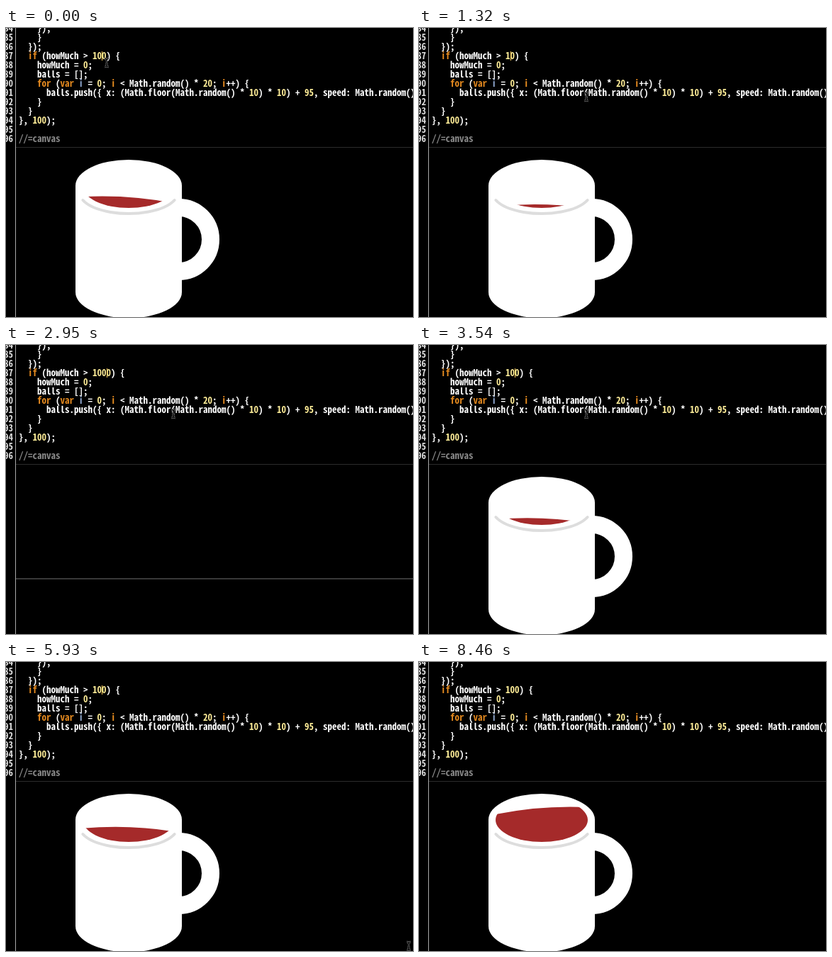
These frames come from a looping animation (574 px wide and 408 px high, 8.51 s). An HTML page with a canvas:

```html
<!DOCTYPE html>
<html lang="en">
<head>
<meta charset="utf-8">
<title>Filling mug</title>
<style>
  html, body { margin: 0; width: 100%; height: 100%; overflow: hidden; background: #000; }
  canvas { display: block; width: 574px; height: 408px; }
</style>
</head>
<body>
<canvas id="stage" width="574" height="408"></canvas>
<script>
const ctx = document.getElementById('stage').getContext('2d');
const W = 574, H = 408, LOOP = 8510;
const FIRST = 117, STEP = 148.8;      // the screen refreshes in even steps
const CHAR = 6.5, LINE = 13, LEFT = 18;
const FAMILY = '"Noto Sans Mono CJK JP", "Noto Sans Mono CJK SC", "Noto Sans Mono", "DejaVu Sans Mono", monospace';
const COLORS = {
  text: '#fff', number: '#ffee98', keyword: '#e58a1f',
  def: '#8da6ce', local: '#e58a1f', comment: '#8a8a8a'
};

// One entry per edit: first step, digits before the caret, blank steps,
// step at which the liquid starts, and how long it rises before a reset.
const EDITS = [
  { at: 0, typed: '10', blank: 0, start: -2.15, cycle: 9 },
  { at: 4, typed: '1', blank: 1, start: 5, cycle: 0.25 },
  { at: 13, typed: '', blank: 1, start: 14, cycle: 0.12 },
  { at: 17, typed: '1', blank: 1, start: 17, cycle: 9 },
  { at: 18, typed: '10', blank: 1, start: 18.4, cycle: 9 },
  { at: 20, typed: '100', blank: 1, start: 20.4, cycle: 9 },
  { at: 22, typed: '10', blank: 1, start: 22.72, cycle: 9 },
  { at: 37, typed: '10', blank: 0, start: 37, cycle: 9 },
  { at: 50, typed: '10', blank: 0, start: 50, cycle: 9 }
];

// step, x, y
const POINTER = [[0, 142, 49], [4, 236, 97], [24, 236, 97], [30, 490, 311],
  [33, 490, 311], [34, 491, 312], [36, 491, 312], [39, 568, 401]];
const POINTER_GONE = 52;

// age in seconds, slope of the liquid surface
const TILT = [[0, 0], [0.19, 2.5], [0.32, 4.6], [0.45, 2.2], [1.04, -5], [1.2, 0]];

function track(keys, pos, col = 1) {
  if (pos <= keys[0][0]) return keys[0][col];
  for (let i = 1; i < keys.length; i++) {
    const a = keys[i - 1], b = keys[i];
    if (pos <= b[0]) return a[col] + (b[col] - a[col]) * (pos - a[0]) / (b[0] - a[0]);
  }
  return keys[keys.length - 1][col];
}

ctx.font = `bold 100px ${FAMILY}`;
const fontSize = CHAR * 100 / ctx.measureText('0').width;
const FONT = `bold ${fontSize}px ${FAMILY}`;

const codeLines = limit => [
  '    }),',
  '    }',
  '  });',
  `  if (howMuch > ${limit}) {`,
  '    howMuch = 0;',
  '    balls = [];',
  '    for (var i = 0; i < Math.random() * 20; i++) {',
  '      balls.push({ x: (Math.floor(Math.random() * 10) * 10) + 95, speed: Math.random() * 10 });',
  '    }',
  '  }',
  '}, 100);',
  '',
  '//=canvas'
];

function tokenColor(token, before) {
  if (token.startsWith('//')) return COLORS.comment;
  if (/^\d/.test(token)) return COLORS.number;
  if (/^(if|for|var)$/.test(token)) return COLORS.keyword;
  if (token === 'i') return before.endsWith('var ') ? COLORS.def : COLORS.local;
  return COLORS.text;
}

function drawCode(limit) {
  ctx.font = FONT;
  ctx.textBaseline = 'alphabetic';
  codeLines(limit).forEach((line, row) => {
    const y = 5 + row * LINE;
    ctx.fillStyle = '#ddd';
    ctx.fillText(String(84 + row), -3, y);
    for (const m of line.matchAll(/\/\/.*|\w+|[^\w\s]+/g)) {
      ctx.fillStyle = tokenColor(m[0], line.slice(0, m.index));
      ctx.fillText(m[0], LEFT + m.index * CHAR, y);
    }
  });
}

function drawLiquid(age) {
  if (age <= 0) return;
  const cx = 173, cy = 223, rx = 65, ry = 31;
  ctx.save();
  ctx.beginPath();
  ctx.ellipse(cx, cy, rx, ry, 0, 0, Math.PI * 2);
  ctx.clip();
  ctx.fillStyle = '#a52a2a';
  ctx.beginPath();
  if (age > 1.07) {
    ctx.rect(cx - rx, cy - ry, rx * 2, ry * 2);
  } else {
    const mid = 253.4 - 45.4 * age, tilt = track(TILT, age), bulge = 4;
    ctx.moveTo(cx - rx, mid + bulge - tilt);
    ctx.quadraticCurveTo(cx, mid - bulge, cx + rx, mid + bulge + tilt);
    ctx.lineTo(cx + rx, 260);
    ctx.lineTo(cx - rx, 260);
  }
  ctx.fill();
  ctx.restore();
}

function drawMug(age) {
  ctx.lineCap = 'butt';
  ctx.strokeStyle = ctx.fillStyle = '#fff';
  ctx.lineWidth = 25;
  ctx.beginPath();
  ctx.arc(243.5, 298.5, 45, -Math.PI / 2, Math.PI / 2);
  ctx.stroke();

  ctx.beginPath();
  ctx.ellipse(173, 222.5, 75, 36.5, 0, Math.PI, 0);
  ctx.ellipse(173, 373, 75, 36.5, 0, 0, Math.PI);
  ctx.fill();

  ctx.strokeStyle = '#ddd';
  ctx.lineWidth = 4;
  ctx.lineCap = 'round';
  ctx.beginPath();
  const end = Math.asin(11 / 30);
  ctx.ellipse(173, 232, 69.5, 30, 0, end, Math.PI - end);
  ctx.stroke();

  drawLiquid(age);
}

function drawPointer(x, y) {
  const trace = () => {
    ctx.beginPath();
    ctx.moveTo(x - 3, y - 6);
    ctx.quadraticCurveTo(x, y - 6, x, y - 3);
    ctx.quadraticCurveTo(x, y - 6, x + 3, y - 6);
    ctx.moveTo(x, y - 4);
    ctx.lineTo(x, y + 4);
    ctx.moveTo(x - 3, y + 6);
    ctx.quadraticCurveTo(x, y + 6, x, y + 3);
    ctx.quadraticCurveTo(x, y + 6, x + 3, y + 6);
    ctx.moveTo(x - 2, y + 2);
    ctx.lineTo(x + 2, y + 2);
    ctx.stroke();
  };
  ctx.lineCap = 'butt';
  ctx.strokeStyle = '#777';
  ctx.lineWidth = 2.4;
  trace();
  ctx.strokeStyle = '#000';
  ctx.lineWidth = 1.1;
  trace();
}

function rule(x, y, w, h, color) {
  ctx.fillStyle = color;
  ctx.fillRect(x, y, w, h);
}

function draw(time) {
  const step = Math.max(0, Math.floor((time - FIRST) / STEP) + 1);
  const edit = EDITS.filter(e => e.at <= step).pop();

  rule(0, 0, W, H, '#000');
  drawCode(edit.typed + '0');
  rule(13, 0, 1, H, '#aaa');
  rule(14, 168, W - 14, 1, '#2c2c2c');

  if (step < edit.at + edit.blank) {
    rule(14, 329, W - 14, 1, '#383838');
    rule(14, 330, W - 14, 1, '#383838');
  } else {
    drawMug((step - edit.start) * STEP / 1000 % edit.cycle);
  }

  const blinkedOff = step > 22 && Math.floor((step - 22.1) / 3.63) % 2 === 1;
  if (!blinkedOff) rule(122 + Math.round(edit.typed.length * CHAR), 33, 1, 13, '#ffd060');

  if (step < POINTER_GONE) {
    drawPointer(track(POINTER, step, 1), track(POINTER, step, 2));
  }
}

const begin = performance.now();
function tick() {
  draw((performance.now() - begin) % LOOP);
  requestAnimationFrame(tick);
}
tick();
</script>
</body>
</html>
```
